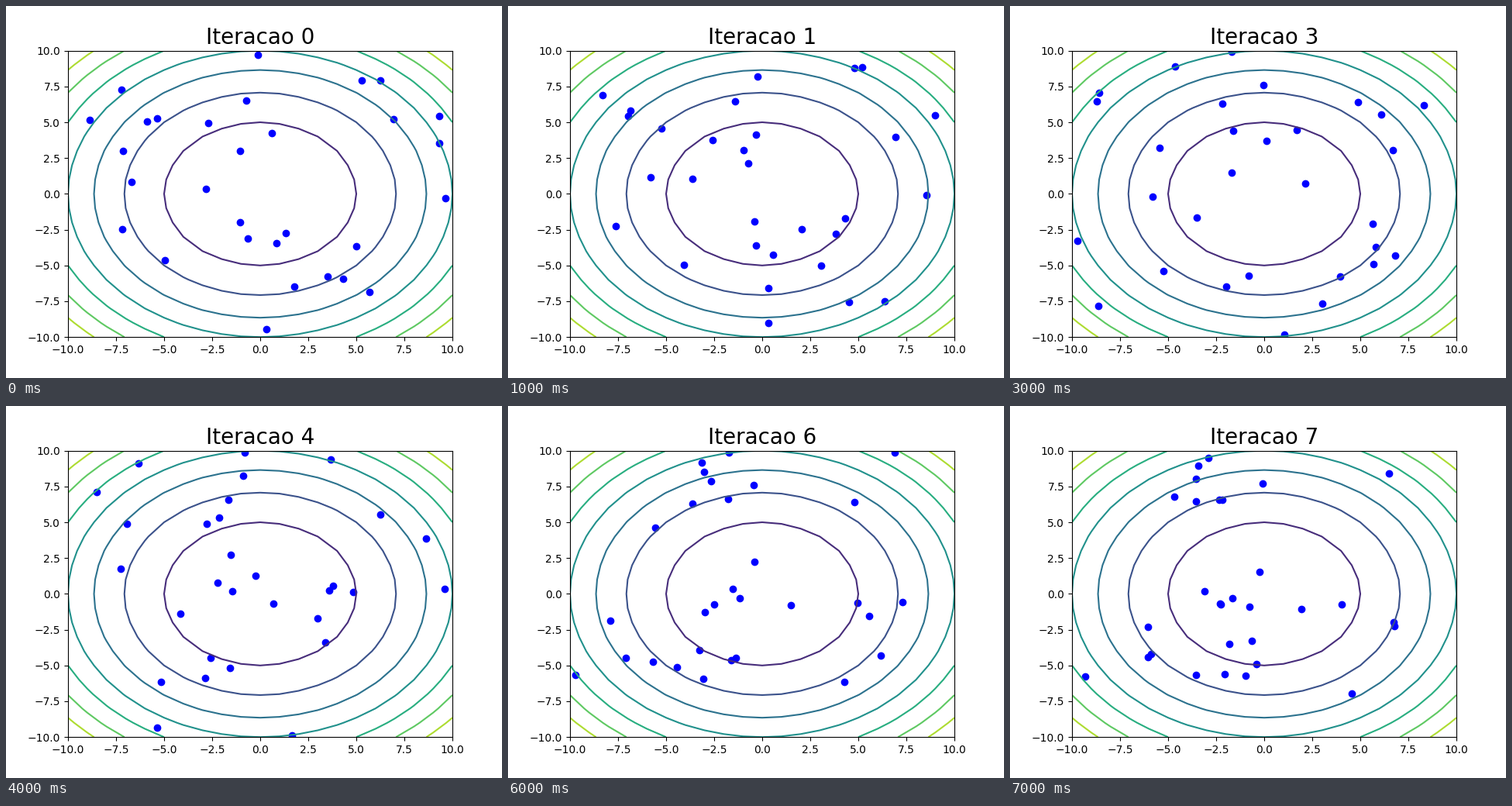
A matplotlib script that plays this animation: 640x480 px, repeating every 8 s.

```python
import numpy as np
import matplotlib.pyplot as plt
from matplotlib.animation import FuncAnimation

STEPS = 8
LIMIT = 10

START = np.array([
    (-0.12, 9.71), (-7.22, 7.27), (-8.87, 5.16), (-5.89, 5.05), (-5.36, 5.27),
    (-2.70, 4.95), (-0.73, 6.52), (0.60, 4.24), (-1.05, 3.00), (-7.14, 3.00),
    (-6.69, 0.83), (-2.82, 0.35), (5.28, 7.92), (6.25, 7.92), (6.94, 5.22),
    (9.31, 5.43), (9.31, 3.54), (9.64, -0.30), (-7.18, -2.47), (-1.05, -1.98),
    (-0.65, -3.12), (0.85, -3.44), (1.33, -2.74), (-4.96, -4.63), (1.77, -6.47),
    (3.51, -5.77), (4.31, -5.93), (5.00, -3.66), (5.69, -6.85), (0.32, -9.45),
])
END = np.array([
    (-2.90, 9.49), (-3.43, 8.95), (-3.55, 8.03), (-4.68, 6.79), (-3.55, 6.46),
    (-2.34, 6.57), (-2.18, 6.57), (-0.08, 7.71), (6.49, 8.41), (-0.24, 1.54),
    (-3.10, 0.18), (-2.30, -0.68), (-2.26, -0.74), (-1.65, -0.30), (-0.77, -0.90),
    (1.94, -1.06), (4.03, -0.74), (6.73, -1.98), (6.77, -2.25), (-6.05, -2.31),
    (-5.89, -4.20), (-6.05, -4.42), (-9.31, -5.77), (-3.55, -5.66), (-2.06, -5.61),
    (-0.97, -5.71), (-1.81, -3.50), (-0.65, -3.28), (-0.40, -4.90), (4.56, -6.96),
])


def fold(p):
    """Reflect coordinates at the walls of the search box."""
    return np.abs((p - LIMIT) % (4 * LIMIT) - 2 * LIMIT) - LIMIT


def swarm(step):
    """Particles jump at random while drifting to their final spread."""
    share = step / (STEPS - 1)
    rng = np.random.default_rng(step)
    settled = rng.random((len(START), 1)) < share
    spread = 8 * share * (1 - share)
    jump = rng.normal(0, 1, START.shape) * spread
    return fold(np.where(settled, END, START) + jump)


fig, ax = plt.subplots(figsize=(6.4, 4.8), dpi=100)
axis = np.linspace(-LIMIT, LIMIT, 21)
x, y = np.meshgrid(axis, axis)
ax.contour(x, y, x**2 + y**2, levels=np.arange(0, 201, 25))
dots = ax.scatter(*START.T, color="blue")
ax.set(xlim=(-LIMIT, LIMIT), ylim=(-LIMIT, LIMIT))
title = ax.set_title("Iteracao 0", fontsize=20)


def update(step):
    dots.set_offsets(swarm(step))
    title.set_text(f"Iteracao {step}")
    return dots, title


anim = FuncAnimation(fig, update, frames=STEPS, interval=1000,
                     repeat=True, repeat_delay=0)
plt.show()
```
